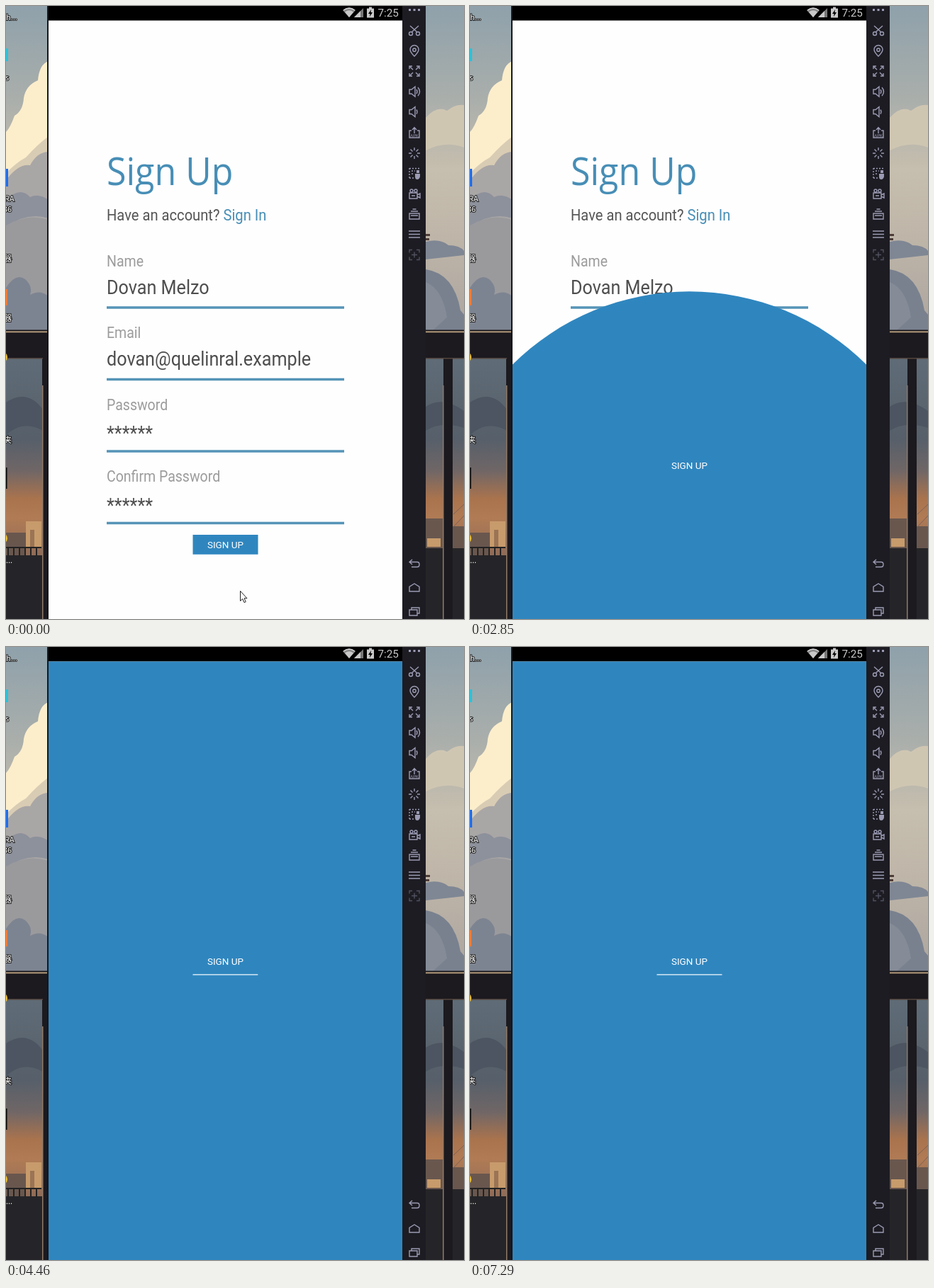
These frames come from a looping animation (646 by 866 pixels, 8000 ms). An HTML page:

```html
<!DOCTYPE html>
<html lang="en">
<head>
<meta charset="utf-8">
<title>Sign up</title>
<style>
html, body { margin: 0; width: 100%; height: 100%; overflow: hidden; background: #1c1a1f; }
svg { display: block; width: 646px; height: 866px; font-family: Roboto, sans-serif; }
.desk { font: 11px "Noto Sans CJK SC", "Noto Sans", sans-serif; fill: #fff; stroke: #222; stroke-width: 2px; paint-order: stroke; }
.form { filter: blur(.5px); }
.title { font: 55.6px "Open Sans", sans-serif; }
.lead { font-size: 22.4px; fill: #555; }
.blue { fill: #478eb6; }
.label { font-size: 21.7px; fill: #9c9c9c; }
.value { font-size: 28px; fill: #4e4e4e; }
.switch { font-size: 13.5px; fill: #fff; text-anchor: middle; }
.icons { fill: none; stroke: #9b9bb4; stroke-width: 1.4; }
.icons .solid { fill: #9b9bb4; stroke: none; }
</style>
</head>
<body>
<svg viewBox="0 0 646 866">
  <defs>
    <linearGradient id="sky" x2="0" y2="1">
      <stop offset="0" stop-color="#8fa1ab"/>
      <stop offset=".28" stop-color="#a9aeab"/>
      <stop offset=".5" stop-color="#c6beae"/>
      <stop offset=".7" stop-color="#bfb6a9"/>
      <stop offset="1" stop-color="#aca59f"/>
    </linearGradient>
    <linearGradient id="dusk" x2="0" y2="1">
      <stop offset="0" stop-color="#5f6c77"/>
      <stop offset=".4" stop-color="#565f6a"/>
      <stop offset=".56" stop-color="#6f6666"/>
      <stop offset=".7" stop-color="#a9734e"/>
      <stop offset=".8" stop-color="#b07b55"/>
      <stop offset="1" stop-color="#8d6a57"/>
    </linearGradient>
    <clipPath id="screen"><path d="M60 20.500h499v846H60z"/></clipPath>
    <clipPath id="box"><path d="M263 747h93v28h-93z"/></clipPath>
  </defs>

  <!-- wallpaper -->
  <path fill="url(#sky)" d="M0 0h646v460H0z"/>
  <path fill="#fceecb" d="M60 78Q47 82 45 105Q28 112 25 130Q24 148 12 155Q6 172 0 178V260H60z"/>
  <path fill="#d9ccb4" d="M0 236Q16 220 28 214Q44 196 60 184V270H0z"/>
  <path fill="#a9a6a6" d="M0 246Q18 222 34 225Q44 206 60 206V460H0z"/>
  <path fill="#8d919b" d="M0 274Q20 254 34 270Q46 264 60 274V300Q30 290 0 312z"/>
  <path fill="#9a9a9d" d="M0 310Q30 292 60 302V460H0z"/>
  <path fill="#7d8491" d="M0 398Q14 376 27 386Q38 396 34 408Q48 400 60 410V460H0z"/>
  <path fill="#cfc6b2" d="M592 158Q608 140 622 148Q634 138 646 140V200Q620 190 592 204z"/>
  <path fill="#7f8794" d="M592 333Q612 328 624 338Q640 338 646 346V352L592 358z"/>
  <path fill="#4d3c37" d="M592 322h6v3h-6zM592 328h5v3h-5z"/>
  <path fill="#79818f" d="M592 372Q632 378 641 430L646 436V460H592z"/>
  <path fill="#858c98" d="M592 390Q616 400 622 440L600 460H592z"/>
  <path fill="url(#dusk)" d="M0 498h646v282H0z"/>
  <path fill="#4c5561" d="M0 560Q30 540 52 570V600Q24 584 0 606zM592 566Q616 550 646 572V596Q614 586 592 600z"/>
  <path fill="#69574e" d="M0 744h28v34H0zM592 724h24v54h-24zM630 735h16v43h-16z"/>
  <path fill="#c79b6b" d="M28 728h22v37H28zM594 752h19v12h-19z"/>
  <path fill="#9a7454" d="M34 740h6v25h-6z"/>
  <path stroke="#7d6153" d="M631 718L646 704M631 736L646 720" fill="none"/>
  <path fill="#252529" d="M0 776h60v90H0zM592 766h54v100H592z"/>
  <path fill="none" stroke="#222" stroke-width="2" d="M0 765H50M3 765v12M11 765v12M19 765v12M27 765v12M35 765v12M43 765v12"/>
  <path fill="#1c1a1f" d="M0 457.500h60V498H0zM592 457.500h54V498h-54zM51 498h9v368h-9zM617 498h13v368h-13z"/>
  <path fill="#c4a985" d="M0 459.500h58v1.700H0zM592 459.500h54v1.700h-54z"/>
  <path fill="#54443c" d="M0 497h52v1.500H0zM592 497h54v1.500h-54z"/>
  <path fill="#927a66" d="M51 536h1.500v330h-1.500zM616 536h1.500v330h-1.500z"/>

  <!-- desktop shortcuts -->
  <path fill="#26c4dc" d="M0 60h3v18H0z"/>
  <path fill="#1c6df0" d="M0 230h3v25H0z"/>
  <path fill="#f47c35" d="M0 400h2v23H0z"/>
  <path fill="#050505" d="M0 652h1.500v30H0z"/>
  <circle cx="-6" cy="496" r="8" fill="#f0c030"/>
  <circle cx="-6" cy="752" r="8" fill="#f0c030"/>
  <g class="desk">
    <text x="0" y="20">h...</text><text x="-1" y="105">s</text>
    <text x="-2" y="276">RA</text><text x="-4" y="291">36</text>
    <text x="-3" y="361">器</text><text x="-3" y="445">器</text>
    <text x="-3" y="617">夹</text><text x="0" y="787">...</text>
  </g>

  <!-- phone -->
  <path fill="#17171b" d="M58 0h502v866H58z"/>
  <path d="M60 0h499v21H60z"/>
  <path fill="#fefefe" d="M60 20.500h499V866H60z"/>
  <g fill="#c9c9c9">
    <path fill="#888" d="M475 6Q484 -1 493 6L484 16z"/>
    <path d="M478 8.500Q484 4 490 8.500L484 16z"/>
    <path fill="none" stroke="#d5d5d5" stroke-width="1.500" d="M476 6Q484 0 492 6"/>
    <path fill="#777" d="M504 3V16H491z"/>
    <path d="M500 7V16H491z"/>
    <path d="M512 1.500h4v2h3v13h-10v-13h3z"/>
    <path fill="#000" d="M515 5l-4 6h2.500l-.5 4 4-6h-2.500z"/>
    <text x="524.500" y="15" font-size="15.200">7:25</text>
  </g>

  <!-- form -->
  <g class="form">
    <g transform="translate(142) scale(.9 1)">
      <text class="title blue" y="253.500">Sign Up</text>
      <text class="lead" y="303.500">Have an account? <tspan class="blue">Sign In</tspan></text>
      <text class="label" y="368">Name</text>
      <text class="value" y="407">Dovan Melzo</text>
      <text class="label" y="469.500">Email</text>
      <text class="value" y="508.500">dovan@quelinral.example</text>
      <text class="label" y="571">Password</text>
      <text class="value" y="613.500">******</text>
      <text class="label" y="672.500">Confirm Password</text>
      <text class="value" y="715">******</text>
    </g>
    <path stroke="#5594b7" stroke-width="3.600" d="M142 426h335M142 527.500h335M142 629h335M142 730.500h335"/>
  </g>

  <path id="cursor" fill="#fff" stroke="#222" d="M.5 .5V14.500L3.700 11.600L6 16.700L8.200 15.700L6 10.800H10z"/>
  <g clip-path="url(#screen)">
    <path fill="#2f86bf" d="M263.500 747h92v27.700h-92z"/>
    <circle id="ripple" cx="309.500" cy="756.500" fill="#2f86bf"/>
    <rect id="line" x="263.500" y="462.300" height="1.200" fill="#fff"/>
    <g id="lift"><g clip-path="url(#box)" class="switch">
      <text id="sign" x="309.500" y="766.300">SIGN UP</text>
      <text id="done" x="311.500" y="766.300">SUCCESS</text>
    </g></g>
  </g>

  <!-- toolbar -->
  <path fill="#1d1c23" d="M559 0h33v866h-33z"/>
  <g class="icons" transform="translate(576)">
    <path class="solid" d="M-8 4h3v3h-3zM-1.500 4h3v3h-3zM5 4h3v3h-3z"/>
    <path d="M-6 28L4 37M6 28L-4 37"/>
    <circle cx="-5" cy="39" r="2.500"/><circle cx="5" cy="39" r="2.500"/>
    <path d="M0 71Q-6 65 -6 61.500A6 6 0 0 1 6 61.500Q6 65 0 71z"/><circle cy="62" r="2.200"/>
    <path d="M-7 89v-4h4M3 85h4v4M7 95v4h-4M-3 99h-4v-4M-6 86l4 4M6 86l-4 4M-6 98l4-4M6 98l-4-4"/>
    <path id="horn" d="M-7 118h3l5-4v14l-5-4h-3zM3 118q2 3 0 6"/>
    <path d="M5 115q5 6 0 12"/>
    <use href="#horn" y="28.500"/>
    <path d="M-4 176h-3v10h14v-10h-3M0 180v-8M-3 175l3-3.500 3 3.500"/>
    <text class="solid" y="184.500" font-size="6" text-anchor="middle">APK</text>
    <path d="M0 200v4M0 212v4M-8 208h4M4 208h4M-5.500 202.500l3 3M5.500 202.500l-3 3M-5.500 213.500l3-3M5.500 213.500l-3-3"/>
    <path stroke-dasharray="2 2" d="M-7 229.500h15M-7 229v15M-7 243h7M-4 233h5M-4 237h4"/>
    <path class="solid" d="M1 237h7v4q-1 4-4 4t-3-4zM3 232h4v4h-4z"/>
    <circle cx="-4" cy="261" r="2"/><circle cx="2" cy="261" r="2"/>
    <path d="M-7 264h11v8h-11zM4 267l4-2v6l-4-2M-4 268h5"/>
    <path d="M-7 293h14v8h-14zM-5 290h10M-2.500 287h5M-5 296h10"/>
    <path d="M-8 318h16M-8 322.500h16M-8 327h16"/>
    <path stroke="#515160" d="M-3 344.500h-4v4M3 344.500h4v4M-3 358.500h-4v-4M3 358.500h4v-4M-4 351.500h8M0 347.500v8"/>
    <path d="M-3 782l-4 3.500 4 3.500M-7 785.500h11q3 0 3 3.500t-3 3.500h-8"/>
    <path d="M-7 827v-6.500l7-4.500 7 4.500v6.500z"/>
    <path d="M-7 853h11v8h-11zM-4 853v-3h11v8h-3"/>
  </g>
</svg>
<script>
const $ = id => document.getElementById(id);
const clamp = x => Math.min(1, Math.max(0, x));

// time, x, y of the pointer tip
const path = [
  [0, 330, 826], [59, 330, 826], [60, 330, 831], [495, 330, 831], [670, 519, 831],
  [1105, 519, 831], [1270, 496, 807], [1845, 496, 807], [2060, 315, 759], [2250, 477, 794]
];

function pointer(t) {
  const i = path.findIndex(k => k[0] > t);
  if (i < 0) return path[path.length - 1].slice(1);
  const [t0, x0, y0] = path[i - 1], [t1, x1, y1] = path[i];
  const p = (t - t0) / (t1 - t0);
  return [x0 + (x1 - x0) * p, y0 + (y1 - y0) * p];
}

function place(el, dx, alpha) {
  el.setAttribute("transform", `translate(${dx})`);
  el.setAttribute("opacity", alpha);
}

function slide(from, to, x) {
  const enter = 1 - (1 - x) ** 2, leave = x ** 1.6;
  place(from, 92.5 * leave, 1 - leave);
  place(to, 92.5 * (enter - 1), enter);
}

function draw(t) {
  $("cursor").setAttribute("transform", `translate(${pointer(t)})`);

  const rise = (1 - Math.cos(Math.PI * clamp((t - 2597) / 627))) / 2;
  $("ripple").setAttribute("r", 1000 * rise);
  $("lift").setAttribute("transform", `translate(0 ${-317 * rise})`);

  // critically damped spring
  const s = Math.max(0, t - 3209) * 0.0066;
  $("line").setAttribute("width", 92 * (1 - (1 + s) * Math.exp(-s)));

  if (t < 6470) slide($("sign"), $("done"), clamp((t - 4680) / 830));
  else slide($("done"), $("sign"), clamp((t - 6470) / 830));
}

const start = performance.now();
function tick() {
  draw((performance.now() - start) % 8000);
  requestAnimationFrame(tick);
}
tick();
</script>
</body>
</html>
```
